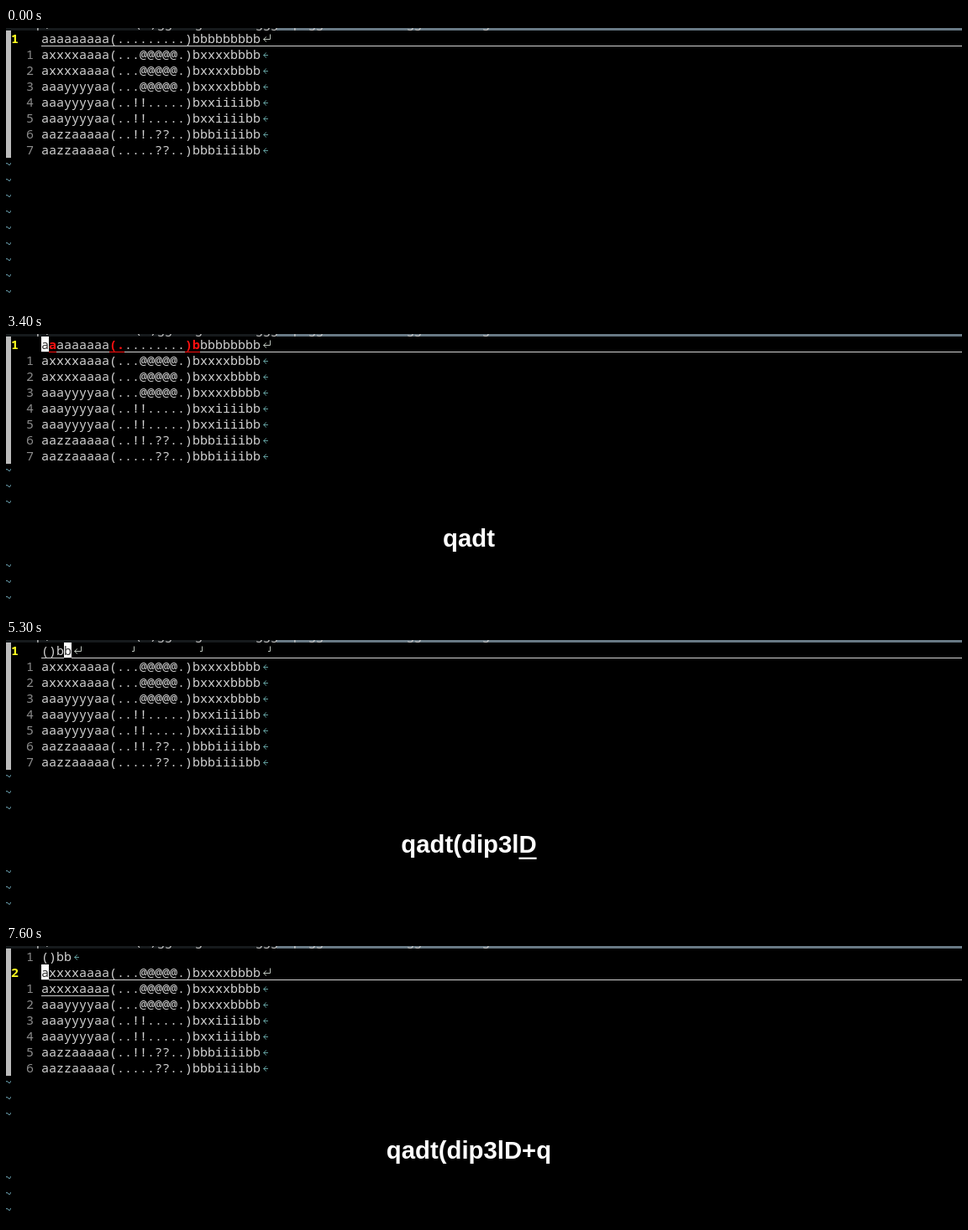
Write an HTML page with a canvas that moves like this. It is 1138x332 px and loops after 8000 ms.

```html
<!DOCTYPE html>
<html>
<head>
<meta charset="utf-8">
<style>
  html, body { margin: 0; width: 1138px; height: 332px; overflow: hidden; background: #000; }
  canvas { display: block; }
</style>
</head>
<body>
<canvas id="stage" width="1138" height="332"></canvas>
<script>
const ctx = document.getElementById('stage').getContext('2d');
const W = 1138, H = 332, LOOP = 8000, TICK = 100;
const LEFT = 42, TOP = 3, CELL = 9, ROW = 19;
const MONO = '15px "Noto Sans Mono", "DejaVu Sans Mono", monospace';
const FG = '#d2d2d2', TEAL = '#5f9a9a', ARROW = '#b8c0b8';

const BUFFER = [
  'aaaaaaaaa(.........)bbbbbbbbb',
  'axxxxaaaa(...@@@@@.)bxxxxbbbb',
  'axxxxaaaa(...@@@@@.)bxxxxbbbb',
  'aaayyyyaa(...@@@@@.)bxxxxbbbb',
  'aaayyyyaa(..!!.....)bxxiiiibb',
  'aaayyyyaa(..!!.....)bxxiiiibb',
  'aazzaaaaa(..!!.??..)bbbiiiibb',
  'aazzaaaaa(.....??..)bbbiiiibb'
];

// Keystrokes: when each key goes down, how long it is held, what it does
const KEYS = [
  { key: 'q', at: 2000 },
  { key: 'a', at: 2300, hold: 400 },
  { key: 'd', at: 3100 },
  { key: 't', at: 3300, hold: 100 },
  { key: '(', at: 3500, run: s => edit(s, s.lines[0].slice(s.lines[0].indexOf('(')), 0) },
  { key: 'd', at: 3800 },
  { key: 'i', at: 3900, hold: 300 },
  { key: 'p', at: 4000, run: s => edit(s, s.lines[0].replace(/\(.*\)/, '()'), 1) },
  { key: '3', at: 4800 },
  { key: 'l', at: 5000, run: s => { s.col += 3; } },
  { key: 'D', at: 5300, run: s => edit(s, s.lines[0].slice(0, s.col), s.col - 1) },
  { key: '+', at: 6100, run: s => { s.row++; s.col = 0; s.tails = []; } },
  { key: 'q', at: 6600 }
];

// Replace the first line; its old arrow tail stays on screen
function edit(s, line, col) {
  s.tails.push(s.lines[0].length);
  s.lines[0] = line;
  s.col = col;
}

function stateAt(t) {
  const s = { lines: [...BUFFER], row: 0, col: 0, tails: [], typed: KEYS.filter(k => k.at <= t) };
  for (const k of s.typed) if (k.run) k.run(s);
  s.last = s.typed.length ? s.typed[s.typed.length - 1] : { at: -700 };
  return s;
}

// Solid for 700 ms after a key, then 250 ms off and 400 ms on
function cursorOn(idle) {
  return idle < 700 || (idle - 700) % 650 >= 250;
}

function rect(x, y, w, h, color) {
  ctx.fillStyle = color;
  ctx.fillRect(x, y, w, h);
}

function text(str, x, row, color, bold) {
  ctx.font = (bold ? 'bold ' : '') + MONO;
  ctx.fillStyle = color;
  ctx.fillText(str, x, 18 + row * ROW);
}

// One underlined cell in other colours
function cell(s, col, color, back, bold) {
  const x = LEFT + col * CELL, y = TOP + s.row * ROW;
  rect(x, y, CELL, ROW, back);
  text(s.lines[s.row][col], x, s.row, color, bold);
  rect(x, y + ROW - 1, CELL, 1, color);
}

// Return arrow, wider than its cell; only the part between from and to shows
function eol(len, row, color, from, to) {
  const x = LEFT + len * CELL, y = TOP + row * ROW;
  ctx.save();
  ctx.beginPath();
  ctx.rect(x + from, y, to - from, ROW);
  ctx.clip();
  ctx.translate(x, y);
  ctx.stroke(new Path2D('M11.5 4.5V10.5H3.5M7 7.5L3.5 10.5L7 13.5'));
  ctx.restore();
}

// Lower edge of the bar above the window
function topBar() {
  ctx.save();
  ctx.beginPath();
  ctx.rect(0, 0, W, TOP);
  ctx.clip();
  rect(0, 0, 322, TOP, '#161a1c');
  rect(322, 0, W - 322, TOP, '#687984');
  ctx.font = MONO;
  ctx.fillStyle = '#c8c8c8';
  ctx.fillText('    p,           ( )gg   g       ggg  p gg           gg        g', 0, -1);
  ctx.restore();
}

function editor(s, t) {
  topBar();
  rect(0, TOP, 6, s.lines.length * ROW, '#bcbcbc');
  s.lines.forEach((line, i) => {
    const here = i === s.row;
    if (here) text(String(i + 1), 6, i, '#ffff20', true);
    else text(String(Math.abs(i - s.row)), 24, i, '#8c8c8c');
    text(line, LEFT, i, FG);
    ctx.strokeStyle = here ? ARROW : TEAL;
    eol(line.length, i, ctx.strokeStyle, 0, here ? 16 : CELL);
  });
  ctx.strokeStyle = ARROW;
  for (const len of s.tails) eol(len, 0, ARROW, CELL, 16);

  rect(LEFT, 21 + s.row * ROW, W - LEFT, 1, FG);
  if (s.row > 0) rect(LEFT, 40 + s.row * ROW, 9 * CELL, 1, FG);

  const chars = [...s.lines[s.row]];
  chars.forEach((c, i) => {
    const bracket = '()'.includes(c) && '()'.includes(chars[s.col]);
    const jump = s.last.key === 't' && chars.indexOf(c, s.col + 1) === i;
    if (bracket) cell(s, i, '#e0523c', '#000');
    else if (jump) cell(s, i, '#ff1010', '#000', true);
  });
  if (cursorOn(t - s.last.at)) cell(s, s.col, '#303030', '#fff');

  for (let i = s.lines.length; i < 17; i++) text('~', -2, i - 0.1, '#6fa8b8');
}

function caption(typed, t) {
  if (!typed.length) return;
  rect(0, 212, W, 58, '#000');
  ctx.font = 'bold 29.33px "Liberation Sans", Arial, sans-serif';
  ctx.fillStyle = '#fff';
  const keys = typed.map(k => k.key).join('');
  const widthOf = n => ctx.measureText(keys.slice(0, n)).width;
  const x = 551 - widthOf(keys.length) / 2;
  ctx.fillText(keys, x, 254);
  typed.forEach((k, i) => {
    if (t < k.at + (k.hold || 200)) rect(x + widthOf(i), 259.6, widthOf(i + 1) - widthOf(i), 2.2, '#fff');
  });
}

function frame() {
  const now = performance.now() % LOOP;
  const t = now - now % TICK;
  const s = stateAt(t);
  rect(0, 0, W, H, '#000');
  editor(s, t);
  caption(s.typed, t);
  requestAnimationFrame(frame);
}
frame();
</script>
</body>
</html>
```
